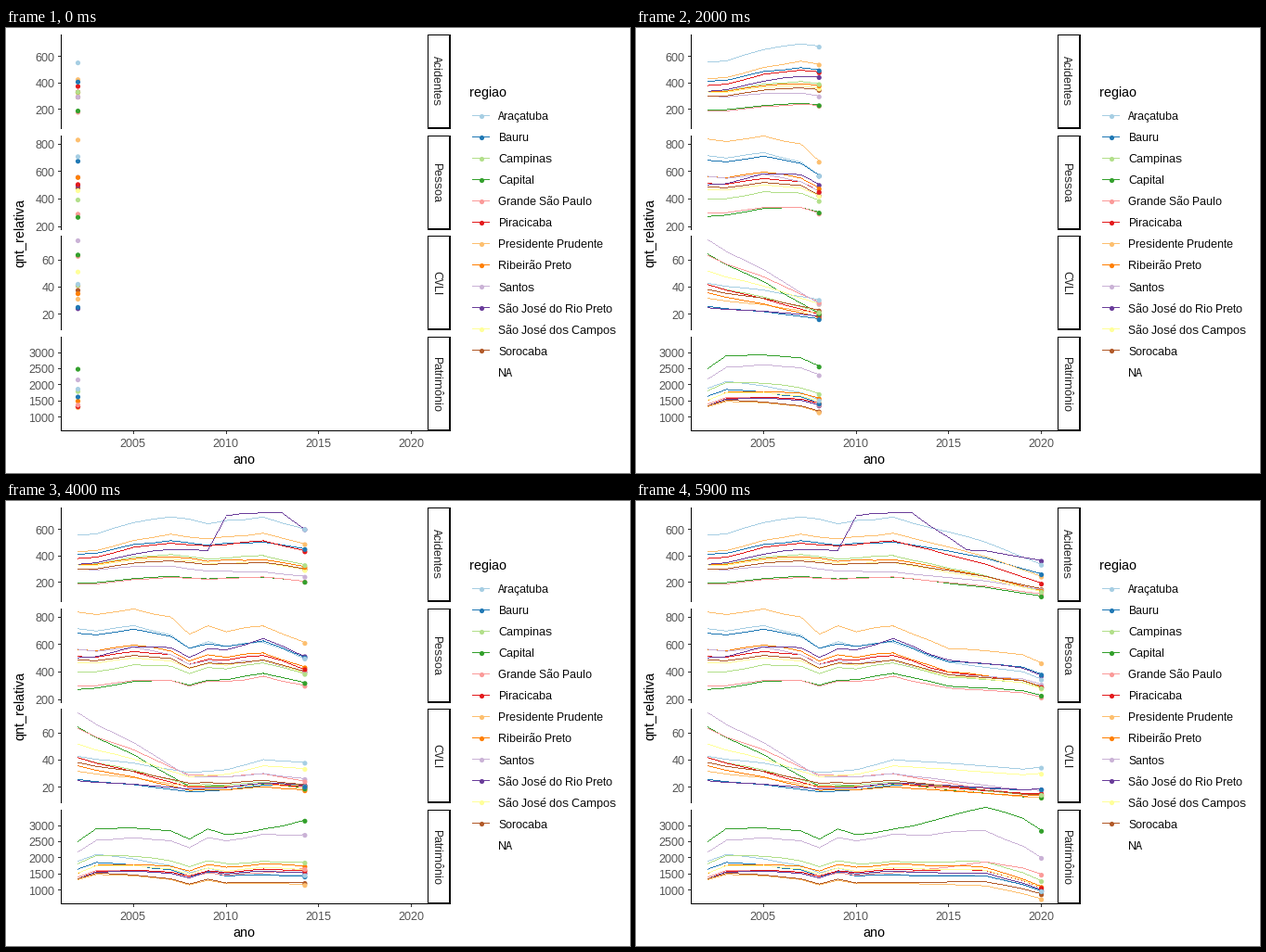
A matplotlib script that plays this animation: 672 by 480 pixels, repeating every 10000 ms.

```python
import numpy as np
import matplotlib.pyplot as plt
from matplotlib.animation import FuncAnimation
from matplotlib.patches import Rectangle

W, H, DPI = 672, 480, 96
PX = 72 / DPI
MOVING, TOTAL = 60, 100
YEARS = np.arange(2002, 2021)
DOT = 5.2 * PX

plt.rcParams["font.family"] = "Liberation Sans"
plt.rcParams["text.hinting"] = "native"
plt.rcParams["text.hinting_factor"] = 1
rng = np.random.default_rng(4)

REGIONS = {
    "Araçatuba": "#A6CEE3", "Bauru": "#1F78B4", "Campinas": "#B2DF8A",
    "Capital": "#33A02C", "Grande São Paulo": "#FB9A99",
    "Piracicaba": "#E31A1C", "Presidente Prudente": "#FDBF6F",
    "Ribeirão Preto": "#FF7F00", "Santos": "#CAB2D6",
    "São José do Rio Preto": "#6A3D9A", "São José dos Campos": "#FFFF99",
    "Sorocaba": "#B15928",
}

# Every region runs from a first level over a middle one to a last one;
# all regions of a panel share the same swing around that trend.
PANELS = [
    dict(title="Acidentes", ticks=range(600, 100, -200), y=30.8, scale=0.1425,
         middle=2012,
         swing={2002: 1, 2003: .99, 2005: 1.1, 2007: 1.12, 2009: 1, 2012: 1,
                2015: 1.04, 2017: 1.08, 2020: 1},
         levels=[(552, 680, 330), (407, 502, 258), (330, 392, 125),
                 (188, 234, 90), (178, 234, 105), (374, 508, 187),
                 (425, 562, 240), (330, 366, 133), (293, 270, 140),
                 (330, 470, 360, 255), (325, 340, 125), (293, 345, 145)]),
    dict(title="Pessoa", ticks=range(800, 100, -200), y=125, scale=0.1487,
         middle=2012,
         swing={2002: 1, 2003: .99, 2005: 1.07, 2007: 1.01, 2008: .875,
                2009: .955, 2010: .925, 2012: 1, 2015: .9, 2017: .97,
                2019: 1.05, 2020: 1},
         levels=[(707, 612, 342), (674, 617, 378), (393, 462, 280),
                 (267, 385, 225), (290, 362, 212), (505, 518, 288),
                 (828, 730, 460), (556, 535, 285), (558, 480, 305),
                 (497, 630, 370), (460, 480, 275), (480, 485, 290)]),
    dict(title="CVLI", ticks=range(60, 10, -20), y=250, scale=1.467,
         middle=2008,
         swing={2002: 1, 2003: .99, 2005: 1.03, 2008: 1, 2010: 1.06,
                2012: 1.25, 2015: 1.14, 2019: .97, 2020: 1},
         levels=[(42, 30, 34), (25, 16, 18), (41, 21, 14),
                 (63.5, 20, 12), (62.5, 28, 13.5), (41, 19, 15),
                 (31, 20, 12), (35, 17, 13), (74, 27, 17),
                 (24, 18, 18), (51, 27, 29.5), (37.5, 22.5, 14)]),
    dict(title="Patrimônio", ticks=range(3000, 500, -500), y=350, scale=0.0348,
         middle=2012,
         swing={2002: 1, 2003: 1.14, 2005: 1.12, 2007: 1.04, 2008: .93,
                2009: 1.04, 2010: .97, 2012: 1, 2014: 1.08, 2017: 1.25,
                2019: 1.13, 2020: 1},
         levels=[(1863, 1450, 950), (1620, 1420, 950), (1790, 1840, 1260),
                 (2480, 2870, 2820), (1370, 1500, 1460), (1320, 1610, 1050),
                 (1290, 1180, 700), (1490, 1770, 1080), (2150, 2670, 1980),
                 (1320, 1550, 980), (1500, 1650, 1050), (1320, 1210, 850)]),
]


def yearly(panel, first, mid, last, surge=0):
    trend = np.interp(YEARS, [2002, panel["middle"], 2020], [first, mid, last])
    swing = np.interp(YEARS, list(panel["swing"]), list(panel["swing"].values()))
    jitter = 1 + rng.uniform(-.015, .015, len(YEARS)) * np.sin(np.pi * (YEARS - 2002) / 18)
    jump = np.interp(YEARS, [2009, 2010, 2013, 2016], [0, 1, 1, 0])
    return trend * swing * jitter + surge * jump


def value_y(panel, value):
    return panel["y"] + (panel["ticks"][0] - value) * panel["scale"]


def year_x(year):
    return 77.5 + 19.95 * (np.asarray(year) - 2002)


def pixel_path(ys):
    """Pixels of a one-pixel-wide stepped line through the yearly heights."""
    steps = [np.linspace(k, k + 1, int(max(20, abs(dy))), endpoint=False)
             for k, dy in enumerate(np.diff(ys))]
    t = np.append(np.concatenate(steps), len(ys) - 1)
    xy = year_x(2002 + t), np.interp(t, np.arange(len(ys)), ys)
    return np.floor(xy) + 0.25


fig = plt.figure(figsize=(W / DPI, H / DPI), dpi=DPI, facecolor="white")
ax = fig.add_axes([0, 0, 1, 1])
ax.set(xlim=(0, W), ylim=(H, 0))
ax.axis("off")


def box(x, y, w, h, color="black"):
    ax.add_patch(Rectangle((int(x), int(y)), w, h, fc=color, lw=0, zorder=3))


def label(x, y, text, size=9, color="black", **kw):
    ax.text(x, y, text, fontsize=size, color=color, **kw)


curves, paths, lines = [], [], []
for k, panel in enumerate(PANELS):
    top = round(7 + 108.6 * k)
    box(59, top, 1, 102)
    for value in panel["ticks"]:
        y = value_y(panel, value)
        box(56, y, 3, 1, "#333333")
        label(52.5, y + 5, str(value), color="#4D4D4D", ha="right")
    box(454, top, 25, 102)
    box(455, top + 1, 22, 99, "white")
    label(463.8, top + 50.5, panel["title"], color="#1A1A1A", rotation=-90,
          ha="center", va="center")
    for color, levels in zip(REGIONS.values(), panel["levels"]):
        ys = value_y(panel, yearly(panel, *levels))
        curves.append(ys)
        paths.append(pixel_path(ys))
        lines += ax.plot([], [], ",", color=color, zorder=1)

box(59, 434, 395, 1)
for year in range(2005, 2021, 5):
    x = float(year_x(year))
    box(x, 435, 1, 3, "#333333")
    label(x - 0.7, 452, str(year), color="#4D4D4D", ha="center")
label(256, 470, "ano", 11, ha="center")
label(15.5, 220.5, "qnt_relativa", 11, rotation=90, ha="center", va="center")

label(499.5, 74, "regiao", 11)
for i, name in enumerate([*REGIONS, "NA"]):
    y = 94.5 + 23.04 * i
    label(530, y + 4.7, name)
    if name in REGIONS:
        box(502, y, 19, 1, REGIONS[name])
        ax.plot(511.5, y, "o", color=REGIONS[name], ms=DOT, mew=0, zorder=5)

# Heads of earlier regions lie on top.
heads = ax.scatter(np.zeros(len(curves)), np.zeros(len(curves)), s=DOT ** 2,
                   lw=0, zorder=2, c=(list(REGIONS.values()) * len(PANELS))[::-1])

# Every year is reached on a whole frame.
ARRIVAL = np.round((YEARS - 2002) * (MOVING - 1) / 18)


def draw(frame):
    now = np.interp(frame, ARRIVAL, YEARS)
    x = float(year_x(now))
    for line, (xs, ys) in zip(lines, paths):
        shown = xs <= x
        line.set_data(xs[shown], ys[shown])
    heads.set_offsets([(x, np.interp(now, YEARS, ys)) for ys in reversed(curves)])
    return [*lines, heads]


anim = FuncAnimation(fig, draw, frames=TOTAL, interval=100, repeat=True,
                     repeat_delay=0, blit=False)
plt.show()
```
